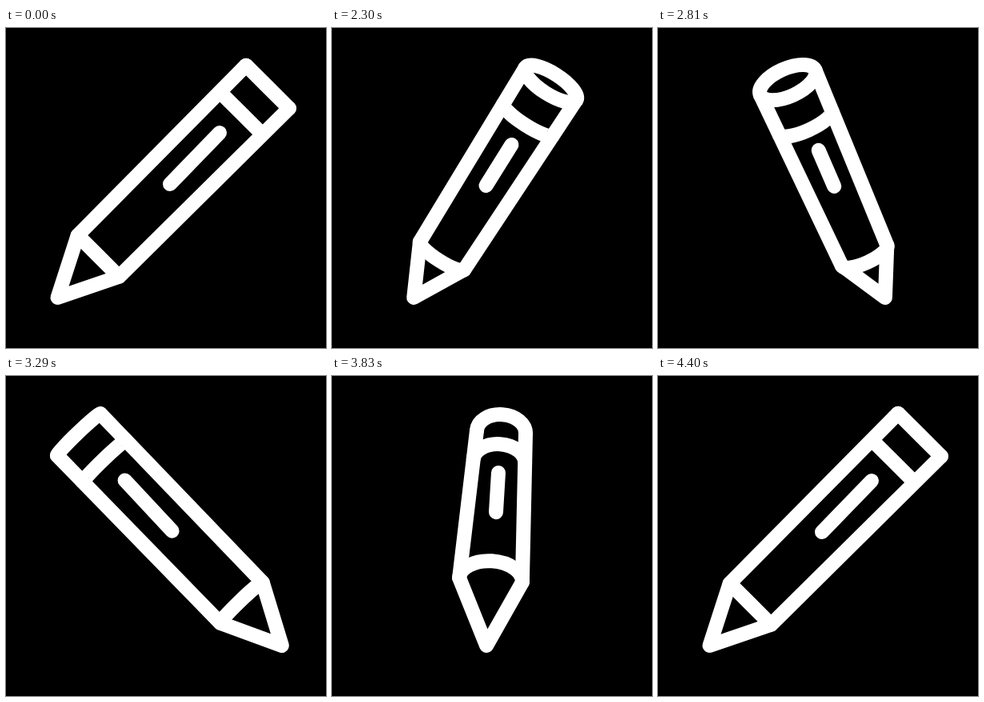
Animation, 400 px wide and 400 px high, one loop 4.43 s. Source, as an HTML page with a canvas:

```html
<!DOCTYPE html>
<html lang="en">
<head>
<meta charset="utf-8">
<title>Turning pencil</title>
<style>
  html, body { margin: 0; width: 100%; height: 100%; overflow: hidden; background: #000; }
  canvas { display: block; width: 400px; height: 400px; }
</style>
</head>
<body>
<canvas id="stage" width="400" height="400"></canvas>
<script>
const ctx = document.getElementById('stage').getContext('2d');
const LOOP = 4430, REST = 2000, STEP = 30, STEPS = 80, CENTER = 206;

// Each value is given for [side-on, top towards viewer, top away from viewer].
// reach: horizontal distance from the turning axis; bow: signed depth of a ring's arc.
const PARTS = {
  top:   { reach: [121, 70, 70],        y: [73.5, 66, 70],  r: [38, 37.5, 30.5], bow: [0, 22, -22] },
  joint: { reach: [-90.5, -103, -96],   y: [285, 284, 255], r: [36.5, 29, 39.5], bow: [0, 12, -24] },
  tip:   { reach: [-141.5, -152, -165], y: [337, 337, 337] },
  clipA: { reach: [61, -9, 25],         y: [131, 161, 121] },
  clipB: { reach: [-1, -37, -13],       y: [195, 199, 170] }
};
// The band lies this far along the body from top to joint.
const BAND = { along: [0.156, 0.26, 0.2], bow: [0, 13, -22] };

const lerp = (a, b, k) => a + (b - a) * k;

function pose(angle) {
  const cos = Math.cos(angle), sin = Math.sin(angle), turn = Math.abs(sin);
  const mix = ([side, front, back], k) => lerp(side, sin > 0 ? front : back, k);
  const depth = turn ** 2, curve = turn ** 1.5;
  const parts = {};
  for (const [name, p] of Object.entries(PARTS)) {
    parts[name] = { x: CENTER + mix(p.reach, depth) * cos, y: mix(p.y, depth) };
    if (p.r) Object.assign(parts[name], { r: mix(p.r, depth), bow: mix(p.bow, curve) });
  }
  const { top, joint } = parts, along = mix(BAND.along, depth);
  const between = key => lerp(top[key], joint[key], along);
  parts.band = { x: between('x'), y: between('y'), r: between('r'), bow: mix(BAND.bow, curve) };
  return parts;
}

function polyline(...points) {
  ctx.beginPath();
  points.forEach(p => ctx.lineTo(p.x, p.y));
  ctx.stroke();
}

function ringArc({ x, y, r, bow }, tilt) {
  ctx.beginPath();
  ctx.ellipse(x, y, r, Math.abs(bow), tilt, 0, Math.PI, bow < 0);
  ctx.stroke();
}

function draw(angle) {
  const { top, band, joint, tip, clipA, clipB } = pose(angle);
  const tilt = Math.atan2(top.x - tip.x, tip.y - top.y);
  const edge = (ring, side) => ({
    x: ring.x + side * ring.r * Math.cos(tilt),
    y: ring.y + side * ring.r * Math.sin(tilt)
  });

  ctx.fillStyle = '#000';
  ctx.fillRect(0, 0, 400, 400);
  ctx.strokeStyle = '#fff';
  ctx.lineWidth = 18;
  ctx.lineJoin = 'round';

  ctx.lineCap = 'butt';
  ringArc(band, tilt);

  ctx.lineCap = 'round';
  polyline(edge(top, -1), edge(joint, -1), tip, edge(joint, 1), edge(top, 1));
  ringArc(top, tilt);
  ringArc(joint, tilt);
  if (top.bow > 0) ringArc({ ...top, bow: -top.bow }, tilt);
  polyline(clipA, clipB);
}

function tick() {
  const t = performance.now() % LOOP;
  const step = Math.max(0, Math.floor((t - REST) / STEP));
  draw(step / STEPS * 2 * Math.PI);
  requestAnimationFrame(tick);
}
tick();
</script>
</body>
</html>
```
